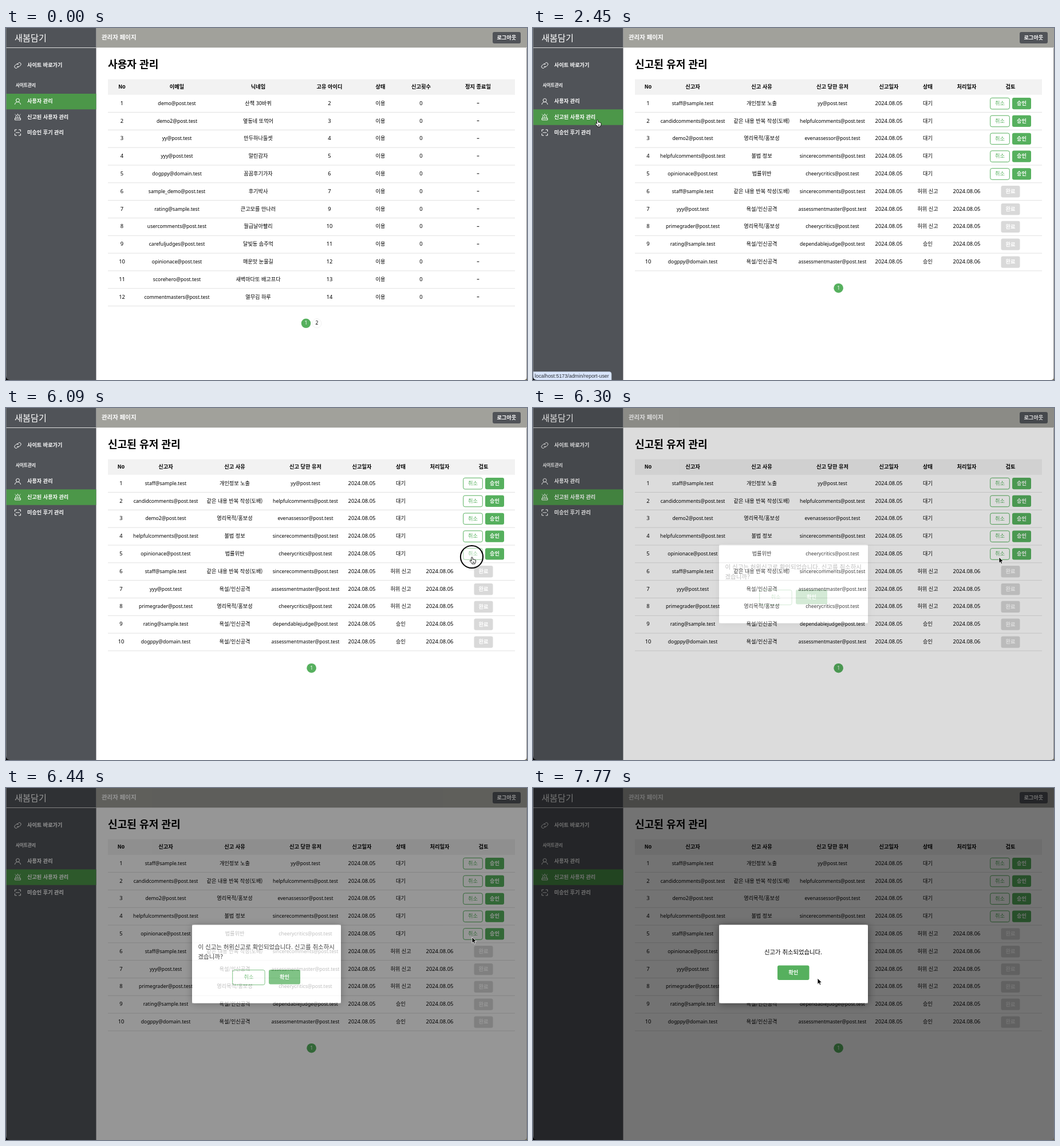
Write an HTML page that moves like this. It is 910 px wide and 616 px high and loops after 8000 ms.

```html
<!DOCTYPE html>
<html lang="ko">
<head>
<meta charset="utf-8">
<title>관리자 페이지</title>
<style>
  html, body { margin: 0; width: 100%; height: 100%; overflow: hidden; background: #fff; }
  svg { display: block; width: 100vw; height: 100vh; }
  text { font-family: "Noto Sans CJK KR", "Noto Sans CJK", sans-serif; white-space: pre; }
  .latin { font-family: "Noto Sans", "Open Sans", sans-serif; }
  .url { font-family: "Liberation Sans", sans-serif; }
  .card { filter: drop-shadow(0 1px 7px rgba(0, 0, 0, .45)); }
</style>
</head>
<body>
<svg id="stage" viewBox="0 0 910 616" xmlns="http://www.w3.org/2000/svg"></svg>
<script>
const LOOP = 8000, STEP = 70;
const GREEN = '#56b05e', DARK = '#505358', INK = '#000';
const SIDE = 157.5;
const stage = document.getElementById('stage');

function el(parent, tag, attrs = {}) {
  const node = document.createElementNS(stage.namespaceURI, tag);
  for (const key in attrs) node.setAttribute(key, attrs[key]);
  parent.appendChild(node);
  return node;
}
const group = parent => el(parent, 'g');
const rect = (p, x, y, width, height, fill, more) => el(p, 'rect', { x, y, width, height, fill, ...more });
const path = (p, d, more) => el(p, 'path', { d, fill: 'none', ...more });
const show = (node, on) => { node.style.display = on ? '' : 'none'; };

function label(p, x, y, str, size, fill, more = {}) {
  const node = el(p, 'text', { x, y, 'font-size': size, fill, ...more });
  node.textContent = str;
  return node;
}
const centered = (p, x, y, str, size, fill, weight = 400, more = {}) =>
  label(p, x, y, str, size, fill, { 'text-anchor': 'middle', 'font-weight': weight, ...more });

function cell(p, x, y, str) {
  if (/[가-힣]/.test(str)) return centered(p, x, y, str, 9.15, INK);
  if (str === '-') return rect(p, x - 1.9, y - 3.6, 3.8, 1, INK);
  centered(p, x, y, str, str.includes('@') ? 8.6 : 9.4, INK, 400, { class: 'latin' });
}

function button(p, x, y, w, h, str, kind) {
  const g = group(p);
  const outline = kind === 'outline';
  rect(g, x, y, w, h, outline ? '#fff' : kind === 'done' ? '#d9d9d9' : GREEN,
    { rx: 3, ...(outline && { stroke: GREEN, 'stroke-width': 1 }) });
  centered(g, x + w / 2, y + h / 2 + 2.8, str, 9.2, outline ? GREEN : '#fff', outline ? 400 : 700);
  return g;
}

// Page frame
rect(stage, 0, 0, 910, 616, '#fff');
rect(stage, SIDE, 0, 910 - SIDE, 34.3, '#a1a19b');
label(stage, 167, 19.6, '관리자 페이지', 10.45, '#fff', { 'font-weight': 700 });
rect(stage, 850, 7, 49, 20, DARK, { rx: 3 });
centered(stage, 874.3, 20.2, '로그아웃', 9.2, '#fff', 700);
rect(stage, 0, 0, SIDE, 616, DARK);
label(stage, 15, 22.6, '새봄담기', 15.2, '#fff', { 'font-weight': 500 });
rect(stage, 0, 34, SIDE, 1, '#dcdddd');
const active = rect(stage, 0, 115, SIDE, 27.4, '#4c9749');
label(stage, 17, 102.9, '사이트관리', 7.6, '#fff', { 'font-weight': 700 });
[['사이트 바로가기', 68.2], ['사용자 관리', 131.2], ['신고된 사용자 관리', 158.6], ['미승인 후기 관리', 186]]
  .forEach(([str, y]) => label(stage, 37, y, str, 9.15, '#fff', { 'font-weight': 700 }));

const icon = (x, y, d) => path(stage, d, {
  transform: `translate(${x} ${y})`, stroke: '#fff', 'stroke-width': 1, 'stroke-linecap': 'round', 'stroke-linejoin': 'round'
});
icon(20.5, 65.5, 'M-1 -2 L1 -4 A2.6 2.6 0 0 1 5 -.4 L2.6 2 A2.6 2.6 0 0 1 -1.2 1.6 M1 2 L-1 4 A2.6 2.6 0 0 1 -5 .4 L-2.6 -2 A2.6 2.6 0 0 1 1.2 -1.6');
icon(20.5, 128.5, 'M-3 -2 a3 3 0 1 0 6 0 a3 3 0 1 0 -6 0 M-5 5 Q-4.5 1 0 1 T5 5');
icon(20.5, 155.5, 'M-3.3 2 V-.3 A3.3 3.3 0 0 1 3.3 -.3 V2 M-5 5 V2.4 H5 V5 Z M0 -1 V1 M0 -5.2 V-5 M-4.6 -4.3 L-4 -3.7 M4.6 -4.3 L4 -3.7');
icon(20.5, 183, 'M-5 -2 V-5 H-2 M2 -5 H5 V-2 M5 2 V5 H2 M-2 5 H-5 V2 M-3 0 H3');

// Tables
const rowY = i => 134.7 + i * 30.82;

function table(title, heads, xs, rows) {
  const g = group(stage);
  label(g, 178, 69.8, title, 18.1, INK, { 'font-weight': 700 });
  rect(g, 178, 89.7, 711, 27.2, '#f2f2f2');
  heads.forEach((str, i) => centered(g, xs[i], 105.8, str, 9.2, INK, 700));
  rows.forEach((row, i) => {
    row.forEach((str, c) => cell(g, xs[c], rowY(i), str));
    rect(g, 178, 147.1 + i * 30.82, 711, 0.9, '#dedede');
  });
  return g;
}

function pager(g, x, y) {
  el(g, 'circle', { cx: x, cy: y, r: 8.3, fill: GREEN });
  centered(g, x, y + 2.4, '1', 8.6, '#fff', 400, { class: 'latin' });
}

const users = [
  ['demo@post.test', '산책 30바퀴'], ['demo2@post.test', '옆동네 또먹어'],
  ['yy@post.test', '만두하나둘셋'], ['yyy@post.test', '말린감자'],
  ['dogppy@domain.test', '꼼꼼후기가자'], ['sample_demo@post.test', '후기박사'],
  ['rating@sample.test', '큰고모를 만나러'], ['usercomments@post.test', '월급날아빨리'],
  ['carefuljudges@post.test', '달빛동 솜주먹'], ['opinionace@post.test', '매운맛 눈물길'],
  ['scorehero@post.test', '새벽마다또 배고프다'], ['commentmasters@post.test', '열무김 하루']
];
const userPage = table('사용자 관리',
  ['No', '이메일', '닉네임', '고유 아이디', '상태', '신고횟수', '정지 종료일'],
  [202.5, 298.5, 440.5, 565, 654, 725, 824.5],
  users.map(([mail, nick], i) => [`${i + 1}`, mail, nick, `${i + (i < 6 ? 2 : 3)}`, '이용', '0', '-']));
pager(userPage, 524, 516.8);
el(userPage, 'circle', { cx: 543, cy: 516.8, r: 8, fill: '#fff', stroke: '#eee', 'stroke-width': .8 });
centered(userPage, 543, 519.2, '2', 8.6, INK, 400, { class: 'latin' });

const SPAM = '같은 내용 반복 작성(도배)', ABUSE = '욕설/인신공격', PROMO = '영리목적/홍보성';
const FALSE = '허위 신고', OK = '승인', WAIT = '대기';
const reports = [
  ['staff@sample.test', '개인정보 노출', 'yy@post.test', WAIT],
  ['candidcomments@post.test', SPAM, 'helpfulcomments@post.test', WAIT],
  ['demo2@post.test', PROMO, 'evenassessor@post.test', WAIT],
  ['helpfulcomments@post.test', '불법 정보', 'sincerecomments@post.test', WAIT],
  ['opinionace@post.test', '법률위반', 'cheerycritics@post.test', WAIT],
  ['staff@sample.test', SPAM, 'sincerecomments@post.test', FALSE, 6],
  ['yyy@post.test', ABUSE, 'assessmentmaster@post.test', FALSE, 5],
  ['primegrader@post.test', PROMO, 'cheerycritics@post.test', FALSE, 5],
  ['rating@sample.test', ABUSE, 'dependablejudge@post.test', OK, 5],
  ['dogppy@domain.test', ABUSE, 'assessmentmaster@post.test', OK, 6]
];
const canceled = [...reports];
canceled[4] = reports[5];
canceled[5] = [...reports[4].slice(0, 3), FALSE, 6];

const cancels = [];
function reportTable(list) {
  const g = table('신고된 유저 관리',
    ['No', '신고자', '신고 사유', '신고 당한 유저', '신고일자', '상태', '처리일자', '검토'],
    [201, 279, 399.5, 523, 621.5, 689.5, 757.5, 834],
    list.map(([from, why, to, state, day], i) =>
      [`${i + 1}`, from, why, to, '2024.08.05', state, day ? `2024.08.0${day}` : '']));
  list.forEach((row, i) => {
    const y = rowY(i) - 12.7;
    if (row[4]) return button(g, 817.5, y, 33, 20.3, '완료', 'done');
    cancels.push(button(g, 798.7, y + .4, 33.6, 19.6, '취소', 'outline'));
    button(g, 837, y, 33, 20.3, '승인');
  });
  pager(g, 533.6, 455.2);
  return g;
}
const reportPage = reportTable(reports);
const hovered = cancels[4];
const donePage = reportTable(canceled);

const urlBar = group(stage);
path(urlBar, 'M0 601.5 H133 Q137 601.5 137 605.5 V616 H0 Z', { fill: '#d9e5fb', stroke: '#b9c4d8', 'stroke-width': .6 });
label(urlBar, 3, 612, 'localhost:5173/admin/report-user', 8.9, '#2b2f36', { class: 'url' });

// Dialog: the shade leaves the card area uncovered
const dialog = group(stage);
path(dialog, 'M0 0 H910 V616 H0 Z M325 239.5 V376.5 H585 V239.5 Z', { fill: '#000', 'fill-opacity': .55, 'fill-rule': 'evenodd' });
rect(dialog, 325, 239.5, 260, 137, '#fff', { rx: 4, class: 'card' });
const ask = group(dialog);
label(ask, 335.5, 282.4, '이 신고는 허위신고로 확인되었습니다. 신고를 취소하시', 10.45, INK);
label(ask, 335.5, 298.8, '겠습니까?', 10.45, INK);
button(ask, 395.7, 318.5, 56.4, 26, '취소', 'outline');
button(ask, 459, 318, 55, 25.5, '확인');
const notice = group(dialog);
centered(notice, 454.5, 291, '신고가 취소되었습니다.', 10.35, INK);
button(notice, 427, 310.5, 55.5, 25.5, '확인');

// Window edges
rect(stage, 909.2, 35, .8, 581, '#777');
rect(stage, 0, 0, .7, 616, '#85888b');
path(stage, 'M0 609 Q0 616 7 616 H0 Z', { fill: '#000' });
path(stage, 'M910 610 Q910 616 904 616 H910 Z', { fill: '#6b6552' });

// Pointer
const pointer = group(stage);
el(pointer, 'circle', { cx: -.5, cy: -.5, r: 19.6, fill: '#fff', 'fill-opacity': .15, stroke: '#000', 'stroke-width': 2 });
path(pointer, 'M0 0 V10.4 L2.4 8.2 L4 11.8 L5.8 11 L4.3 7.5 L7.4 7.4 Z', { fill: '#000', stroke: '#fff', 'stroke-width': .8 });
path(pointer, 'M-1.3 1.3 Q-1.3 0 -.1 0 T1.1 1.3 L1.6 4.2 Q2.4 3.6 3.3 4.4 Q4.2 3.9 5 4.8 Q6.6 4.6 6.6 6.4 L6.2 9 L5.2 10.4 V11.8 H-.2 V10.6 L-3.4 7.2 Q-4.2 5.8 -3 5.4 Q-1.8 5.6 -.7 6.8 Z M1.8 8 V10 M3.2 8 V10',
  { fill: '#fff', stroke: '#000', 'stroke-width': .9, 'stroke-linejoin': 'round' });
const [ring, arrow, hand] = pointer.children;

const route = [
  [210, 353, 506], [770, 99, 104], [980, 99, 104], [1260, 112.5, 161],
  [2380, 112.5, 161], [2450, 112.5, 161], [2870, 727, 246], [3010, 683, 230],
  [3500, 683, 230], [4340, 812, 261], [4410, 814, 261],
  [6510, 814, 261], [6860, 463, 301], [7000, 463, 301], [7350, 497, 333], [LOOP, 497, 333]
];
const ease = k => k * k * (3 - 2 * k);
function pointerAt(t) {
  const i = Math.max(1, route.findIndex(p => p[0] > t));
  const [t0, x0, y0] = route[i - 1], [t1, x1, y1] = route[i];
  const k = ease(Math.min(1, Math.max(0, (t - t0) / (t1 - t0))));
  return [x0 + (x1 - x0) * k, y0 + (y1 - y0) * k];
}
const within = (t, ...spans) => spans.some(([a, b]) => t >= a && t < b);

function draw(ms) {
  const t = Math.floor(ms / STEP) * STEP;
  const [x, y] = pointerAt(t);
  const reported = t >= 1610, finished = t >= 7700;

  show(userPage, !reported);
  show(reportPage, reported && !finished);
  show(donePage, finished);
  active.setAttribute('y', reported ? 142.4 : 115);
  show(urlBar, within(t, [1260, 2800]));
  hovered.setAttribute('opacity', within(t, [4480, 6230]) ? .7 : 1);

  dialog.setAttribute('opacity', Math.min(1, Math.max(0, (t - 6230) / 280)));
  show(dialog, t > 6230);
  show(ask, !finished);
  show(notice, finished);

  const onMenu = t < 2800 && x < SIDE && y > 115 && y < 170;
  const onOk = t > 6800 && t < 7770 && x > 459 && x < 514 && y > 318;
  const pointing = onMenu || onOk || within(t, [4410, 6230]);
  show(pointer, t >= 280);
  pointer.setAttribute('transform', `translate(${x} ${y})`);
  show(ring, within(t, [1400, 1540], [6090, 6230], [7420, 7560]));
  show(arrow, !pointing);
  show(hand, pointing);
}

const start = performance.now();
function tick() {
  draw((performance.now() - start) % LOOP);
  requestAnimationFrame(tick);
}
draw(0);
requestAnimationFrame(tick);
</script>
</body>
</html>
```
